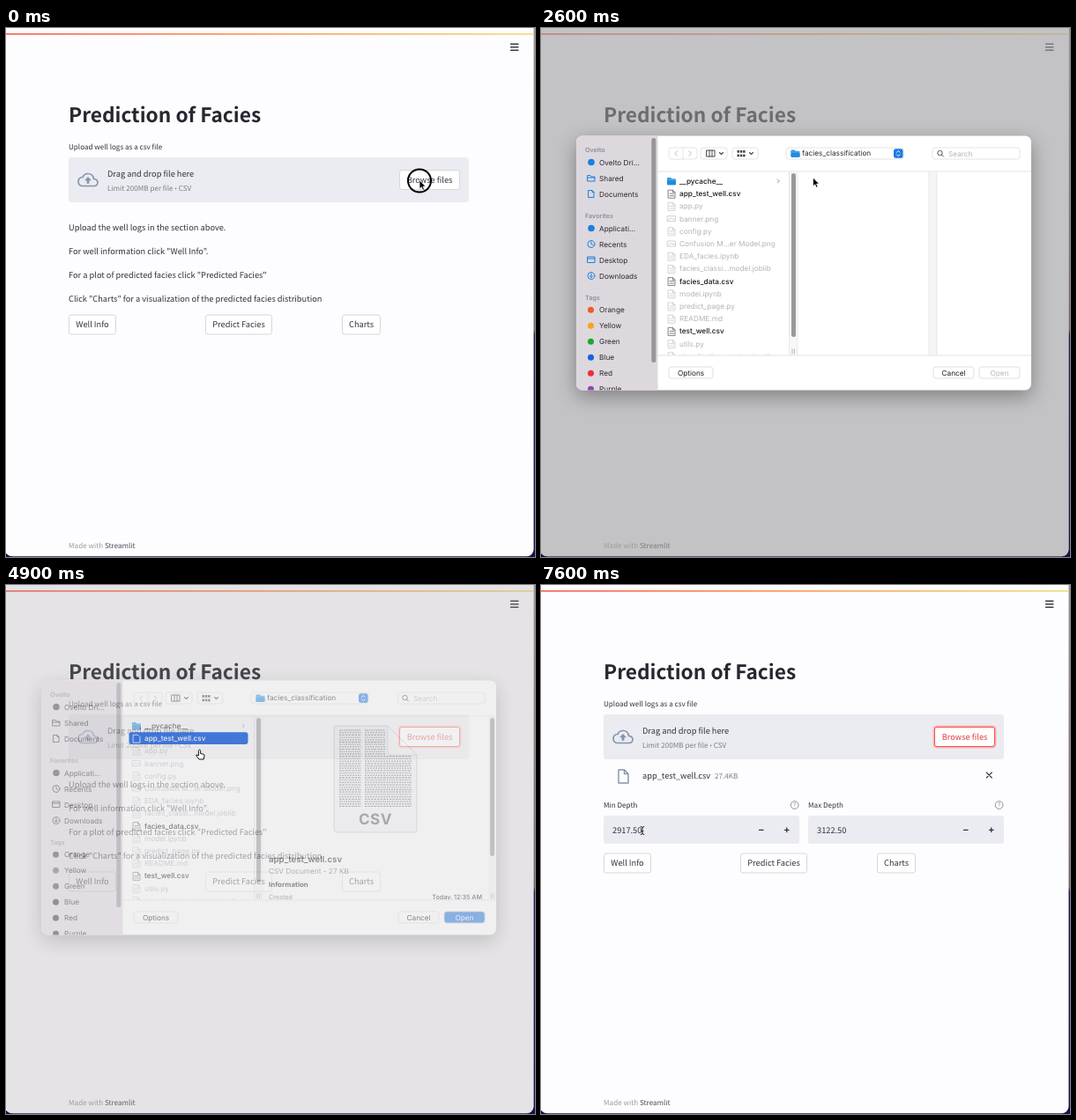
An HTML page that plays this animation: 600x601 px, repeating every 8 s.

```html
<!DOCTYPE html>
<html lang="en">
<head>
<meta charset="utf-8">
<title>Prediction of Facies</title>
<style>
html, body { margin: 0; width: 100%; height: 100%; overflow: hidden; background: #1d1040; }
svg { display: block; width: 100%; height: 100%; text-rendering: geometricPrecision; }
.page { font: 9.25px "Noto Sans CJK JP", "Noto Sans CJK SC", "Noto Sans CJK", "Noto Sans", sans-serif; fill: #31333f; }
.title { font-size: 22.7px; font-weight: 700; fill: #262730; }
.small { font-size: 8.1px; }
.muted { fill: #7c7d86; }
.panel { font: 8.25px Inter, Roboto, sans-serif; fill: #2b2a2e; }
.head { font-size: 7.2px; font-weight: 600; fill: #928d95; }
.off { fill: #b5b3b7; }
.on { font-weight: 500; fill: #1a191c; }
.line { fill: none; stroke-linecap: round; stroke-linejoin: round; }
</style>
</head>
<body>
<svg id="stage" viewBox="0 0 600 601" preserveAspectRatio="none"></svg>
<script>
const text = (x, y, s, cls = '', extra = '') => `<text x="${x}" y="${y}" class="${cls}" ${extra}>${s}</text>`;
const rect = (x, y, w, h, r, fill, extra = '') =>
  `<rect x="${x}" y="${y}" width="${w}" height="${h}" rx="${r}" fill="${fill}" ${extra}/>`;
const line = (d, color, width = 1, extra = '') =>
  `<path class="line" d="${d}" stroke="${color}" stroke-width="${width}" ${extra}/>`;
const circle = (x, y, r, fill, extra = '') => `<circle cx="${x}" cy="${y}" r="${r}" fill="${fill}" ${extra}/>`;
const group = (id, body, extra = '') => `<g id="${id}" ${extra}>${body}</g>`;
const mid = 'text-anchor="middle"';

// ---- web page ----
const webButton = (x, y, w, label) =>
  rect(x + .5, y + .5, w - 1, 22, 2.5, '#fff', 'stroke="#d3d3d9" stroke-width=".9"') +
  text(x + w / 2, y + 14.9, label, '', mid);

const buttonRow = y => webButton(71, y, 54, 'Well Info') + webButton(226, y, 76, 'Predict Facies') + webButton(381, y, 44, 'Charts');

const depthField = (x, label, value) =>
  text(x, 253, label, 'small') +
  circle(x + 216.6, 250, 4.4, 'none', 'stroke="#85868f" stroke-width=".9"') +
  text(x + 216.6, 252.4, '?', 'muted', mid + ' style="font-size:6.5px"') +
  rect(x, 262, 222, 32, 3, '#ebecf1') +
  text(x + 10, 281.7, value) +
  line(`M${x + 176.5} 278.3h4.6M${x + 205.5} 278.3h4.6m-2.3-2.3v4.6`, '#31333f', 1.3);

const page = `
  ${line('M572.5 18.3h8.4m-8.4 3.5h8.4m-8.4 3.5h8.4', '#3b3c46', 1.4)}
  ${text(71, 107.4, 'Prediction of Facies', 'title')}
  ${text(71, 138, 'Upload well logs as a csv file', 'small')}
  ${rect(71, 147, 454, 51, 3, '#ebecf1')}
  <g transform="translate(81 160.5)">
    ${line('M18.6 11C18 7.4 15.4 5 12 5 9.3 5 7 6.500 6 9 3 9.200 1 11.300 1 14c0 2.800 2.200 5 5 5h13c2.300 0 4-1.800 4-4 0-2.200-1.800-4-4.400-4z', '#8493ae', 1.7)}
    <path d="M12 8.500l-4 4.300h2.600v3.500h2.800v-3.500H16z" fill="#8493ae"/>
  </g>
  ${text(115, 169.4, 'Drag and drop file here')}
  ${text(115, 184.5, 'Limit 200MB per file <tspan font-family="Noto Sans, sans-serif" font-size="7">•</tspan> CSV', 'small muted')}
  ${webButton(446, 161, 69, 'Browse files')}
  ${group('focus',
    rect(446, 161, 69, 23, 3, '#fff', 'stroke="#ffb3b3" stroke-width="3"') +
    rect(446.5, 161.5, 68, 22, 2.5, '#fff', 'stroke="#f5504f" stroke-width="1"') +
    text(480.5, 175.9, 'Browse files', '', mid + ' style="fill:#e2393b"'))}
  ${group('intro', [
    [230.2, 'Upload the well logs in the section above.'],
    [257, 'For well information click "Well Info".'],
    [283.8, 'For a plot of predicted facies click "Predicted Facies"'],
    [310.7, 'Click "Charts" for a visualization of the predicted facies distribution']
  ].map(([y, s]) => text(71, y, s)).join('') + buttonRow(325.5))}
  ${group('loaded',
    line('M88 210h6.500l4.500 4.500v10.500h-11zM94.500 210v4.500h4.500', '#8493ae', 1.4) +
    text(115, 220, 'app_test_well.csv') + text(197, 219.7, '27.4KB', 'small muted') +
    line('M505.300 213l6 6m0-6l-6 6', '#31333f', 1.1) +
    depthField(71, 'Min Depth', '2917.50') + depthField(303, 'Max Depth', '3122.50') + buttonRow(304.5))}
  ${text(71, 591, 'Made with <tspan fill="#4b4c57">Streamlit</tspan>', 'small', 'style="fill:#9b9ba2"')}`;

// ---- file dialog ----
const blue = '#1b7fdf';
const chevron = (x, y, color = '#4a494d', dx = 2, dy = 2) => line(`M${x - dx} ${y - dy / 2}l${dx} ${dy}l${dx} ${-dy}`, color, 1.1);
const folder = (x, y) =>
  rect(x, y - 4, 5, 4, 1, '#2f94d8') + rect(x, y - 2.800, 10, 7, 1, '#3ea6ec') + rect(x, y - .8, 10, 5, 1, '#1f8bdb');
const pill = (x, y, w, label, fill, color) =>
  rect(x, y, w, 13, 3, fill, 'stroke="#d8d7da" stroke-width=".8"') + text(x + w / 2, y + 9.500, label, '', `${mid} style="fill:${color}"`);
const box = (x, w) => rect(x, 136, w, 13, 3, '#fff', 'stroke="#dddce0" stroke-width=".8"');

const places = [
  ['Ovelto Dri...', 152.500], ['Shared', 170.500, 'M-4-3h3l1 1.500h4v5h-8zM-4-.500h8'], ['Documents', 188.500, 'M-3-4h4l2 2v6h-6zM1-4v2h2'],
  ['Applicati...', 227.500], ['Recents', 245.500, 'M4 0a4 4 0 1 0-8 0a4 4 0 1 0 8 0M0-2.500V0l2 1'],
  ['Desktop', 263.500, 'M-4-3.500h8v6.500h-8zM-4-1.500h8'], ['Downloads', 281.500, 'M4 0a4 4 0 1 0-8 0a4 4 0 1 0 8 0M0-2.200v4m-1.700-1.600l1.700 1.700l1.700-1.700']
];
const tags = [['Orange', '#f0592b'], ['Yellow', '#f5a51d'], ['Green', '#1aa82d'], ['Blue', '#1261e8'], ['Red', '#ee2f38'], ['Purple', '#8d46a5']];

const sidebar =
  rect(40, 122, 92.500, 290, 0, '#ddd8de') +
  rect(125.300, 125, 5, 255, 2.500, '#98959a') +
  text(50, 140.500, 'Ovelto', 'head') + text(50, 215.500, 'Favorites', 'head') + text(50, 308.500, 'Tags', 'head') +
  places.map(([s, y]) => text(66, y + 3, s)).join('') +
  tags.map(([s], i) => text(66, 323 + 18 * i, s)).join('') +
  group('icons',
    places.map(([, y, d]) => d ? line(d, blue, 1, `transform="translate(57 ${y})"`) : circle(57, y, 3.800, blue)).join('') +
    tags.map(([, color], i) => circle(56.500, 320.200 + 18 * i, 3.500, color)).join(''));

const toolbar =
  box(145, 32) + line('M161 136v13', '#dddce0', .8) +
  line('M154.500 139.800l-2.500 2.700l2.500 2.700M168 139.800l2.500 2.700l-2.500 2.700', '#b9b7bb', 1) +
  box(181, 30) + line('M188 139h9v7h-9zM191 139v7m3-7v7', '#4a494d', 1) + chevron(204.500, 142.500) +
  box(217, 29) + [0, 3.300, 6.600].map(dx => rect(222.500 + dx, 139, 2.500, 2.800, .4, '#4a494d') + rect(222.500 + dx, 143.500, 2.500, 2.800, .4, '#4a494d')).join('') + chevron(238.500, 142.500) +
  box(278, 133) + folder(283.500, 142.500) + text(296, 145.300, 'facies_classification') +
  rect(400, 137.200, 10.500, 10.600, 2.500, '#1c78e8') + line('M403.500 141.300l1.800-1.800l1.800 1.800m-3.600 2.500l1.800 1.800l1.800-1.800', '#fff', 1) +
  box(444, 99) + circle(452.500, 142, 2.700, 'none', 'stroke="#555" stroke-width="1"') + line('M454.500 144l2 2', '#555') +
  text(462, 145.500, 'Search', 'off');

const files = ['__pycache__', 'app_test_well.csv', 'app.py', 'banner.png', 'config.py', 'Confusion M...er Model.png', 'EDA_facies.ipynb',
  'facies_classi...model.joblib', 'facies_data.csv', 'model.ipynb', 'predict_page.py', 'README.md', 'test_well.csv', 'utils.py', 'visualisation...essing.ipynb'];
const fileRow = (name, i) => {
  const y = 174 + 14.200 * i, active = i === 0 || name.endsWith('.csv'), color = active ? '#77767b' : '#cfcdd1';
  const icon = i === 0 ? folder(143, y)
    : name.endsWith('.png') ? line(`M143.500 ${y - 3}h9v6h-9zm1 5l2.500-3l2 2l1.500-1l1.500 2`, color, .9)
    : line(`M144.500 ${y - 4}h5l2.500 2.500v6.500h-7.500zm5 0v2.500h2.500M146 ${y}h4.500m-4.500 2.500h4.500`, color, .9);
  return icon + text(157, y + 2.900, name, active ? 'on' : 'off');
};
const grip = x => line(`M${x - 1} 365v5m2.500-5v5`, '#aaa8ac', .8);

const list =
  files.map(fileRow).join('') +
  line('M268.300 172l2 2l-2 2', '#8b898d', .9) +
  rect(281, 164, 10, 208, 0, '#f7f6f8') + line('M281.500 164v208M291 164v208', '#e6e5e8', .8) +
  rect(284, 165, 5, 186, 2.500, '#9a999c') + grip(286) +
  rect(440, 164, 9, 208, 0, '#f5f4f6') + line('M440 164v208M449 164v208', '#e2e1e4', .8);

const docLines = Array.from({ length: 33 }, (_, i) => {
  const y = 179 + i * 2.700, end = y < 208 ? 430 : 460;
  return line(`M378 ${y}H403M407 ${y}H${end}`, '#858489', 1.300, `stroke-dasharray="${1.500 + i % 3 * .5} 1" style="stroke-linecap:butt"`);
}).join('');

const preview =
  rect(291.500, 164, 264, 208, 0, '#fff') +
  rect(547, 164, 9, 208, 0, '#f7f6f8') + rect(549, 165, 5, 157, 2.500, '#9a999c') + grip(551.500) +
  `<path d="M375 174h58l33 33v85q0 3-3 3h-88q-3 0-3-3v-115q0-3 3-3z" fill="#f3f2f4" stroke="#bdbbc0" stroke-width=".8"/>` +
  docLines +
  `<path d="M433 174v29q0 4 4 4h29z" fill="#fff" stroke="#c6c4c9" stroke-width=".8"/>` +
  text(419, 286, 'CSV', '', mid + ' style="font-size:17px;font-weight:700;fill:#66656a;letter-spacing:.5px"') +
  text(298, 328.500, 'app_test_well.csv', '', 'style="font-size:9.700px;font-weight:600"') +
  text(298, 341.800, 'CSV Document - 27 KB', '', 'style="fill:#77767b"') +
  text(298, 357, 'Information', '', 'style="font-size:7.900px;font-weight:700"') +
  text(298, 371, 'Created', '', 'style="font-size:7.200px;fill:#77767b"') +
  text(540, 371, 'Today, 12:35 AM', '', 'text-anchor="end" style="font-size:7.200px;font-weight:500"');

const dialog =
  rect(40, 122.500, 516, 289, 7, '#fff', 'style="filter:drop-shadow(0 7px 11px rgba(0,0,0,.34))"') +
  `<g clip-path="url(#panelClip)">${sidebar}${toolbar}
    <g clip-path="url(#listClip)">${list}${group('preview', preview)}</g>
    ${line('M132.500 163H556M132.500 372H556', '#e1e0e3', .9)}</g>` +
  pill(145, 385, 50, 'Options', '#fff', '#1d1c20') + pill(445, 385, 46, 'Cancel', '#fff', '#1d1c20') +
  pill(497, 385, 46, 'Open', '#fff', '#bab8bc') + group('openReady', pill(497, 385, 46, 'Open', '#2478df', '#fff'));

const selection = rect(139.500, 181.300, 135, 13.800, 3, '#2463d4') +
  line('M144.500 184.200h5l2.500 2.500v6.500h-7.500z', '#dfe7f7', .9) + text(157, 191.200, 'app_test_well.csv', 'on', 'style="fill:#fff"');

// ---- pointer shapes, hot spot at 0,0 ----
const pointer =
  group('arrow', '<path d="M0 0v9.800l2.300-2.100l1.500 3.500l1.700-.8l-1.500-3.300h3z" fill="#000" stroke="#fff" stroke-width=".7"/>') +
  group('hand', '<path d="M-.8 1.500q0-1.300 1.100-1.300t1.100 1.300v3l3.200.7q1.300.4 1.200 1.800l-.7 4h-5.300l-3.200-4q-.4-1.300 1-1l1.600 1z" fill="#fff" stroke="#111" stroke-width="1" stroke-linejoin="round"/>') +
  group('beam', line('M-1.800-4.500q1.800 0 1.800 1.200v6.600q0 1.200-1.800 1.200M1.800-4.500q-1.800 0-1.800 1.200M1.800 4.500q-1.800 0-1.800-1.200M-1 .8h2', '#111', .9));

const stage = document.getElementById('stage');
stage.innerHTML = `
  <defs>
    <linearGradient id="bar"><stop offset="0" stop-color="#f8655c"/><stop offset=".45" stop-color="#fb9a58"/><stop offset="1" stop-color="#f0df85"/></linearGradient>
    <linearGradient id="desk" x2="0" y2="1"><stop offset="0" stop-color="#9d8f96"/><stop offset=".57" stop-color="#71606f"/><stop offset=".58" stop-color="#2a1454"/><stop offset="1" stop-color="#17104a"/></linearGradient>
    <clipPath id="windowClip"><rect x="-1" y="-20" width="599.500" height="620.300" rx="8"/></clipPath>
    <clipPath id="panelClip"><rect x="40" y="122.500" width="516" height="289" rx="7"/></clipPath>
    <clipPath id="listClip"><rect x="132" y="163.500" width="424" height="208"/></clipPath>
  </defs>
  ${rect(0, 0, 600, 601, 0, 'url(#desk)')}
  <g clip-path="url(#windowClip)">
    ${rect(0, 0, 600, 601, 0, '#fdfcfe')}
    ${rect(0, 6, 600, 1.700, 0, 'url(#bar)')}
    <g class="page">${page}</g>
    ${rect(0, 0, 600, 601, 0, '#9d9ca0', 'id="dim"')}
  </g>
  ${group('dialog', dialog, 'class="panel"')}
  ${group('selection', selection, 'class="panel"')}
  ${circle(0, 0, 13, 'none', 'id="ring" stroke="#000" stroke-width="2"')}
  ${group('pointer', pointer)}`;

// ---- motion: rows are [ms, value, ...] ----
const pathKeys = [[2000, 469, 173], [2300, 405, 161], [2600, 308.500, 170], [3000, 250, 177], [3400, 219.500, 187],
  [5900, 219, 187], [6300, 196, 208], [6800, 145, 256], [7300, 115, 279]];
const dimKeys = [[1300, 0], [1700, .29], [2000, .595], [4700, .595], [4900, .26], [5100, 0]];
const fadeKeys = [[1200, 0], [1500, 1], [4700, 1], [4900, .47], [5100, 0]];
const slideKeys = [[1200, -25], [1700, -10.500], [2000, 0], [4700, 0], [4900, -14], [5100, -24]];
const markKeys = [[4700, 1], [4900, .85], [5100, 0]];

function at(keys, t) {
  const next = keys.findIndex(k => k[0] > t);
  if (next === 0) return keys[0].slice(1);
  if (next < 0) return keys[keys.length - 1].slice(1);
  const a = keys[next - 1], b = keys[next], p = (t - a[0]) / (b[0] - a[0]);
  return a.slice(1).map((v, i) => v + (b[i + 1] - v) * p);
}

const el = Object.fromEntries([...stage.querySelectorAll('[id]')].map(e => [e.id, e]));
const show = (id, visible) => el[id].style.display = visible ? '' : 'none';

function draw(now) {
  const t = Math.floor(now % 8000 / 100) * 100;
  const [x, y] = at(pathKeys, t), [slide] = at(slideKeys, t), [fade] = at(fadeKeys, t);
  const selected = t >= 4300 && t < 5100;

  el.dim.setAttribute('opacity', at(dimKeys, t)[0]);
  for (const id of ['dialog', 'selection']) el[id].setAttribute('transform', `translate(0 ${slide})`);
  el.dialog.setAttribute('opacity', fade);
  el.selection.setAttribute('opacity', at(markKeys, t)[0]);
  show('dialog', fade > 0);
  show('selection', selected);
  show('preview', t >= 4500);
  show('openReady', t >= 4300);
  el.icons.style.filter = t >= 4800 ? 'grayscale(1) brightness(.6)' : '';

  const uploaded = t >= 5300;
  show('intro', !uploaded);
  show('loaded', uploaded);
  show('focus', t >= 1500);

  const sinceClick = t < 4200 ? t : t - 4200;
  const fading = Math.max(0, Math.min(1, (sinceClick - 100) / 400));
  el.ring.setAttribute('r', 13 + 2 * fading);
  el.ring.setAttribute('opacity', 1 - fading);
  el.ring.setAttribute('transform', `translate(${x} ${y + .5})`);

  const beam = t >= 6000 && y > 262, hand = t >= 4800 && t < 5200;
  el.pointer.setAttribute('transform', `translate(${x} ${y})`);
  show('beam', beam);
  show('hand', hand);
  show('arrow', !beam && !hand);
}

const start = performance.now();
function tick() {
  draw(performance.now() - start);
  requestAnimationFrame(tick);
}
tick();
</script>
</body>
</html>
```
